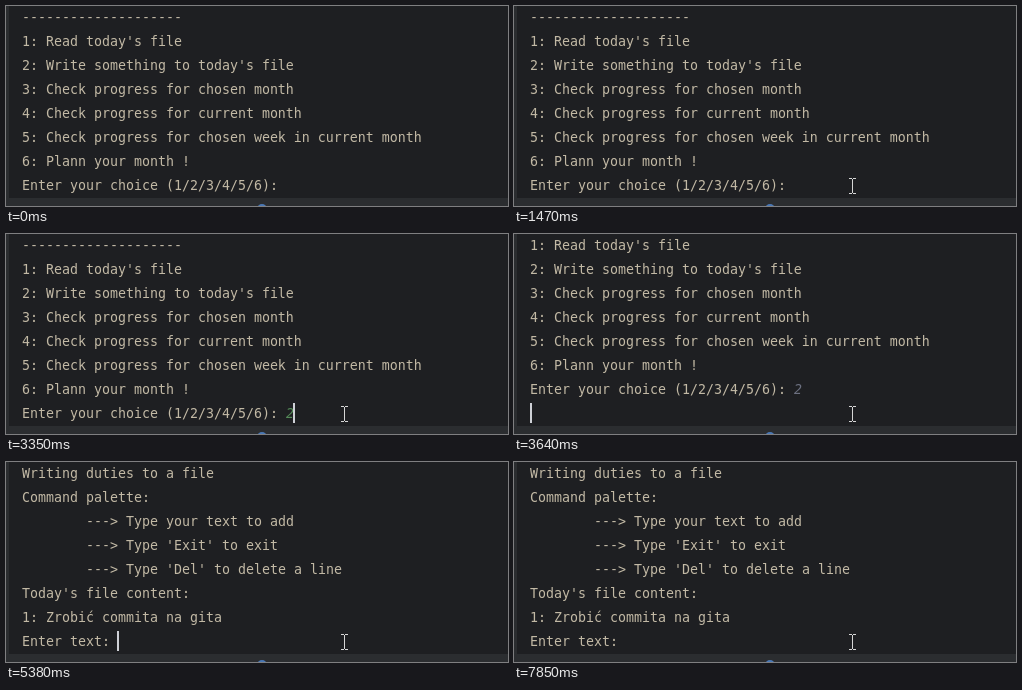
Animation, 502 px wide and 200 px high, one loop 8000 ms. Source, as an HTML page:

```html
<!DOCTYPE html>
<html lang="en">
<head>
<meta charset="utf-8">
<title>Console diary</title>
<style>
  html, body { margin: 0; width: 100%; height: 100%; overflow: hidden; background: #1e1f22; }
  svg { display: block; width: 502px; height: 200px; background: #1e1f22; }
  text { font: 13.29px "DejaVu Sans Mono", monospace; fill: #c2b9a5; }
  .anim { animation: 8s step-end infinite; }

  #menu { animation-name: menu; }
  @keyframes menu {
    0% { transform: none; }
    45.5% { transform: translateY(-24px); }
    49.125%, 100% { visibility: hidden; }
  }
  #editor { animation-name: editor; }
  @keyframes editor {
    0% { visibility: hidden; }
    49.125%, 100% { visibility: visible; }
  }
  #answer { font-style: italic; animation-name: answer; }
  @keyframes answer {
    0% { fill: transparent; }
    27.25% { fill: #548a58; }
    45.5%, 100% { fill: #6c7080; }
  }

  #caret { fill: #ced0d6; animation-name: caret-place, caret-blink; }
  @keyframes caret-place {
    0% { transform: translateX(279px); }
    27.25% { transform: translateX(287px); }
    45.5% { transform: translateX(16px); }
    49.125%, 100% { transform: translateX(111px); }
  }
  @keyframes caret-blink {
    0%, 18.375%, 36.375%, 60%, 72.625%, 85.375%, 98.125%, 100% { opacity: 0; }
    5.375%, 23.625%, 41.875%, 67.25%, 78.125%, 90.875% { opacity: 1; }
  }

  #pointer { fill: none; stroke: #d6d6d6; shape-rendering: crispEdges; animation-name: pointer; }
  @keyframes pointer {
    0% { transform: translate(340px, 174px); visibility: hidden; }
    1.625% { transform: translate(340px, 174px); visibility: visible; }
    3.5%, 100% { transform: translate(335px, 172px); visibility: visible; }
  }
  #click { fill: rgba(255, 255, 0, .47); animation-name: click; }
  @keyframes click {
    0%, 7.5%, 100% { visibility: hidden; }
    5.375% { visibility: visible; }
  }
</style>
</head>
<body>
<svg viewBox="0 0 502 200">
  <g id="menu" class="anim">
    <text x="16" y="16">--------------------</text>
    <text x="16" y="40">1: Read today's file</text>
    <text x="16" y="64">2: Write something to today's file</text>
    <text x="16" y="88">3: Check progress for chosen month</text>
    <text x="16" y="112">4: Check progress for current month</text>
    <text x="16" y="136">5: Check progress for chosen week in current month</text>
    <text x="16" y="160">6: Plann your month !</text>
    <text x="16" y="184">Enter your choice (1/2/3/4/5/6):</text>
    <text x="280" y="184" id="answer" class="anim">2</text>
  </g>
  <g id="editor" class="anim">
    <text x="16" y="16">Writing duties to a file</text>
    <text x="16" y="40">Command palette:</text>
    <text x="80" y="64">---&gt; Type your text to add</text>
    <text x="80" y="88">---&gt; Type 'Exit' to exit</text>
    <text x="80" y="112">---&gt; Type 'Del' to delete a line</text>
    <text x="16" y="136">Today's file content:</text>
    <text x="16" y="160">1: Zrobić commita na gita</text>
    <text x="16" y="184">Enter text:</text>
  </g>
  <path d="M0 0h3v192h499v8H0z" fill="#2b2d30"/>
  <circle cx="256" cy="203" r="5" fill="#4a78b5"/>
  <rect id="caret" class="anim" y="169" width="2" height="20"/>
  <circle id="click" class="anim" cx="336" cy="179" r="12"/>
  <path id="pointer" class="anim" d="M0 .5h3m1 0h3M3.5 1v14M0 15.5h3m1 0h3"/>
</svg>
</body>
</html>
```
